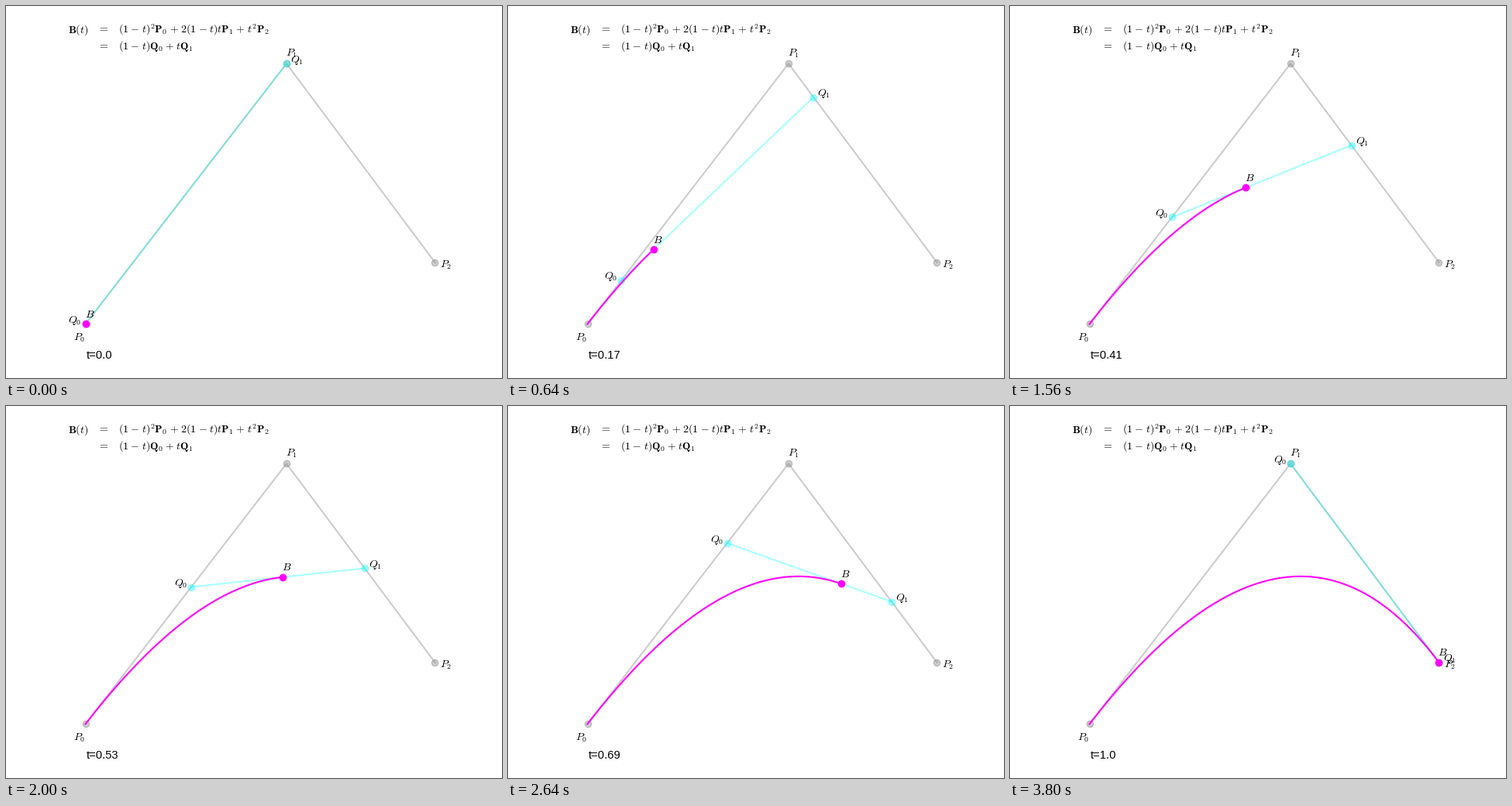
Write a matplotlib script that moves like this. It is 640x480 px and loops after 3.84 s.

```python
import matplotlib.pyplot as plt
import numpy as np
from matplotlib.animation import FuncAnimation

W, H, DPI = 640, 480, 100
FRAMES, INTERVAL = 96, 40
PX = DPI / 72  # pixels per point

plt.rcParams["mathtext.fontset"] = "cm"

P0 = np.array([102.55, 410.4])
P1 = np.array([361.95, 74.4])
P2 = np.array([553.45, 330.8])

fig = plt.figure(figsize=(W / DPI, H / DPI), dpi=DPI, facecolor="white")
ax = fig.add_axes([0, 0, 1, 1])
ax.set_xlim(0, W)
ax.set_ylim(H, 0)
ax.axis("off")


def lerp(a, b, t):
    return (1 - t) * a + t * b


def bezier(t):
    return lerp(lerp(P0, P1, t), lerp(P1, P2, t), t)


def write(x, y, text):
    return ax.text(x, y, text, fontsize=10, va="baseline")


def shift(point, dx, dy):
    """Move a point by an offset in typographic points, y upwards."""
    return point[0] + dx * PX, point[1] - dy * PX


def formula(tex):
    """Put an equals column in front and space the binary operators."""
    space = r"\hspace{0.28}"
    for op in "-+":
        tex = tex.replace(op, space + "{" + op + "}" + space)
    return r"$=\hspace{0.939}" + tex + "$"


# Equations
write(80, 35, r"$\mathbf{B}(t)$")
write(118, 35, formula(
    r"(1-t)^2\mathbf{P}_0+2(1-t)t\mathbf{P}_1+t^2\mathbf{P}_2"))
write(118, 56, formula(r"(1-t)\mathbf{Q}_0+t\mathbf{Q}_1"))

# Control polygon
ax.plot(*np.transpose([P0, P1, P2]), "o-", color="gray", alpha=0.4)
write(*shift(P0, -11.5, -15), "$P_0$")
write(*shift(P1, -0.7, 7), "$P_1$")
write(*shift(P2, 4.5, -5), "$P_2$")

# Moving parts
chord, = ax.plot([], [], "o-", color="cyan", alpha=0.35)
curve, = ax.plot([], [], "-", color="magenta")
dot, = ax.plot([], [], "o", color="magenta")
q0_label = write(0, 0, "$Q_0$")
q1_label = write(0, 0, "$Q_1$")
b_label = write(0, 0, "$B$")
clock = ax.text(103.5, 455, "", fontsize=10.6, family="Liberation Sans",
                va="baseline")


def update(frame):
    t = frame / (FRAMES - 1)
    q0, q1, b = lerp(P0, P1, t), lerp(P1, P2, t), bezier(t)
    chord.set_data(*np.transpose([q0, q1]))
    steps = np.arange(frame + 1) / (FRAMES - 1)
    curve.set_data(*np.transpose([bezier(s) for s in steps]))
    dot.set_data([b[0]], [b[1]])
    q0_label.set_position(shift(q0, -16, 1))
    q1_label.set_position(shift(q1, 3.7, 1))
    b_label.set_position(shift(b, -0.7, 6))
    clock.set_text(f"t={round(t, 2)}")
    return chord, curve, dot, q0_label, q1_label, b_label, clock


anim = FuncAnimation(fig, update, frames=FRAMES, interval=INTERVAL,
                     repeat=True, repeat_delay=0)
plt.show()
```
